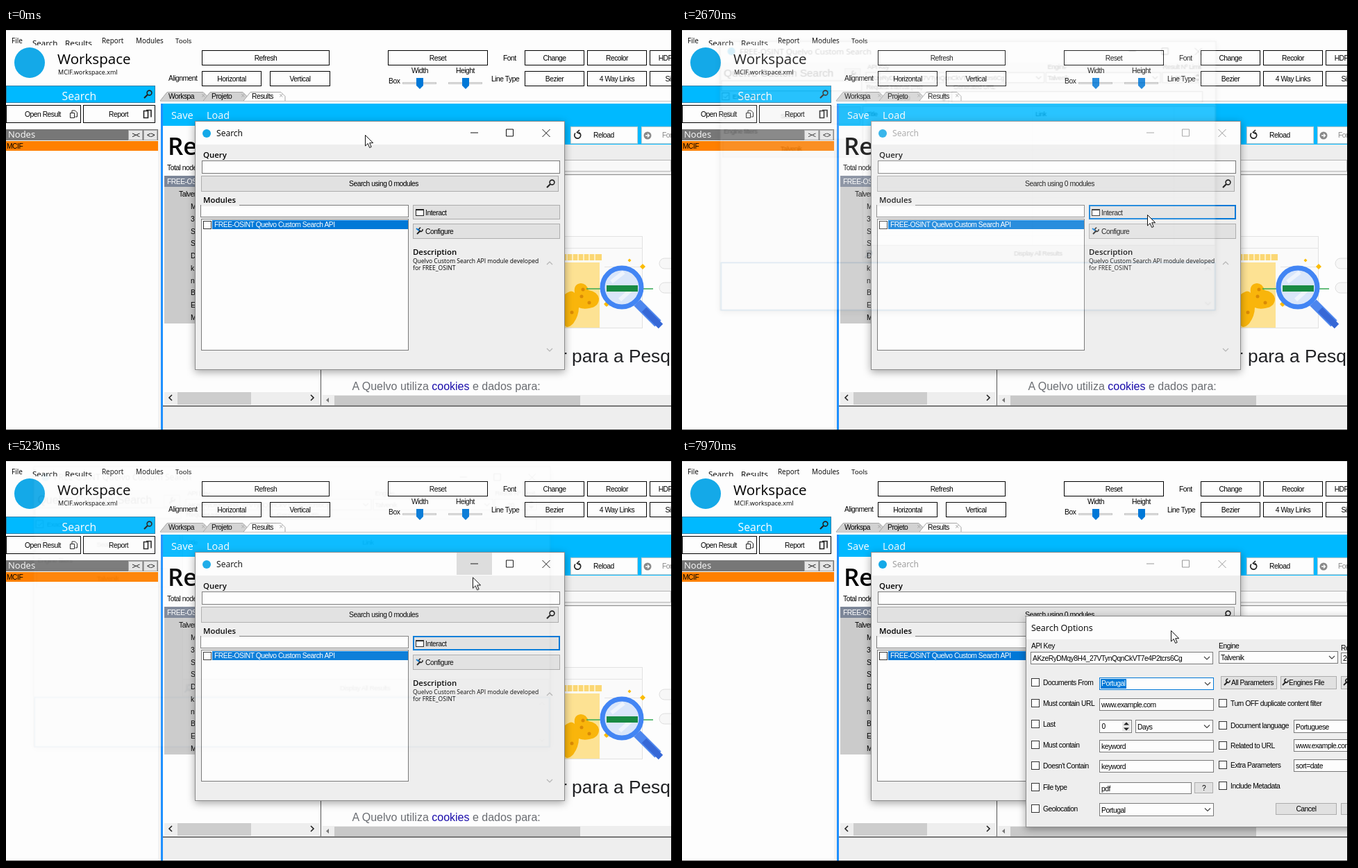
Recreate the animation shown at these times as an HTML page. Size 965 by 581 pixels, loop 8000 ms.

```html
<!DOCTYPE html>
<html lang="en">
<head>
<meta charset="utf-8">
<title>Search modules</title>
<style>
html, body { margin: 0; width: 100%; height: 100%; overflow: hidden; background: #fdfdfd; }
svg { display: block; width: 965px; height: 581px; }
text { white-space: pre; }
.s { font: 10.3px "Liberation Sans", Arial, sans-serif; letter-spacing: -.48px; }
.u { font-family: "Open Sans", "Noto Sans", sans-serif; }
.a { font-family: "Liberation Sans", Arial, sans-serif; }
.shadow { filter: drop-shadow(0 3px 6px rgba(0, 0, 0, .35)); }
#main { transform-origin: 411px 214px; }
#options { transform-origin: 735px 378px; }
</style>
</head>
<body>
<svg id="stage" viewBox="0 0 965 581"></svg>
<script>
const LOOP = 8000;
const SKY = '#00b9ff', BLUE = '#0078d7', FACE = '#eeeeee', EDGE = '#7a7a7a', WHITE = '#fdfdfd';
const KEY = 'AKzeRyDMqy8H4_27VTynQqnCkVT7e4P2tcrs6Cg';

// Boxes are given by their left, top, right and bottom edges.
const box = (l, t, r, b, fill, line, w = 1) => line
  ? `<rect x="${l + w / 2}" y="${t + w / 2}" width="${r - l - w}" height="${b - t - w}" fill="${fill}" stroke="${line}" stroke-width="${w}"/>`
  : `<rect x="${l}" y="${t}" width="${r - l}" height="${b - t}" fill="${fill}"/>`;
const path = (d, stroke = '#222', w = 1, fill = 'none') =>
  `<path d="${d}" fill="${fill}" stroke="${stroke}" stroke-width="${w}"/>`;
const dot = (x, y, r, fill) => `<circle cx="${x}" cy="${y}" r="${r}" fill="${fill}"/>`;
const text = (x, y, s, fill = '#000') => `<text class="s" x="${x}" y="${y}" fill="${fill}">${s}</text>`;
const mid = (x, y, s, fill = '#000') => `<text class="s" x="${x}" y="${y}" fill="${fill}" text-anchor="middle">${s}</text>`;
const ui = (x, y, size, s, fill = '#000', weight = 400) =>
  `<text class="u" x="${x}" y="${y}" font-size="${size}" font-weight="${weight}" fill="${fill}">${s}</text>`;
const group = (id, body) => `<g id="${id}">${body}</g>`;

const button = (l, t, r, b, s, dark) =>
  box(l, t, r, b, dark ? WHITE : '#e1e1e1', dark ? '#000' : '#adadad') + mid((l + r) / 2, (t + b) / 2 + 3.8, s);
const field = (l, t, r, b, s = '', line = EDGE) => box(l, t, r, b, WHITE, line) + text(l + 3, (t + b) / 2 + 4, s);
const chevron = (x, y, dx, dy, c = '#444', w = 1.2) => path(dx
  ? `M${x - 2 * dx} ${y - 4}l${4 * dx} 4l${-4 * dx} 4`
  : `M${x - 4} ${y - 2 * dy}l4 ${4 * dy}l4 ${-4 * dy}`, c, w);
const combo = (l, t, r, b, s, line) => field(l, t, r, b, s, line) + chevron(r - 9, (t + b) / 2, 0, 1);
const spin = (l, t, r, b, s, x) => {
  const m = (t + b) / 2, c = r - 8;
  return box(l, t, r, b, WHITE, EDGE) + box(r - 14, t + 2, r - 2, b - 2, '#e8e8e8') +
    path(`M${c - 4} ${m - 2}h8l-4-4zM${c - 4} ${m + 2}h8l-4 4z`, 'none', 0, '#222') + mid(x, m + 3.5, s);
};
const check = (x, y, on) => box(x, y, x + 12, y + 12, WHITE, '#333') +
  (on ? path(`M${x + 3} ${y + 6}l2.5 2.5l4.5-5`) : '');
const lens = (x, y, c = '#222') => path(`M${x - 1} ${y + 1}l-5 5`, c, 2.2) +
  `<circle cx="${x + 1.5}" cy="${y - 1.5}" r="3.4" fill="none" stroke="${c}" stroke-width="1.6"/>`;
const wrench = (x, y) => path(`M${x - 4} ${y + 4}l5-5`, '#222', 2) +
  path(`M${x + 4} ${y - 3}a2.7 2.7 0 1 1-2.7-2`, '#222', 1.6);
const controls = (x, y, c = '#111') => path(
  `M${x - 5} ${y}h11M${x + 46.5} ${y - 5}h10v10h-10zM${x + 98.5} ${y - 5}l11 11m0-11l-11 11`, c);
const frame = (l, t, r, b, bar) =>
  `<g class="shadow">${box(l, t, r, b, FACE, '#8c8c8c')}</g>` + box(l + 1, t + 1, r - 1, bar, WHITE);

function workspace() {
  let o = box(0, 0, 965, 581, WHITE);
  o += ui(8, 22, 10, 'File') + ui(38, 25.5, 11.6, 'Search') + ui(85, 25.5, 11.6, 'Results') + box(36, 25, 128, 30, WHITE);
  o += ui(138, 22, 9.9, 'Report') + ui(187, 22, 9.9, 'Modules') + ui(244, 22, 9.7, 'Tools');
  o += dot(34, 50, 22, '#14a9e8') + ui(74, 52, 20.6, 'Workspace') + ui(75, 67, 9, 'MCIF.workspace.xml');

  for (const [l, t, r, s] of [
    [282, 32, 466, 'Refresh'], [282, 62, 368, 'Horizontal'], [380, 62, 467, 'Vertical'], [550, 32, 694, 'Reset'],
    [747, 32, 833, 'Change'], [837, 32, 923, 'Recolor'], [927, 32, 975, 'HDPI'],
    [747, 62, 833, 'Bezier'], [837, 62, 923, '4 Way Links'], [927, 62, 990, 'Size']
  ]) o += button(l, t, r, t + 22, s, true);
  o += text(234, 76, 'Alignment') + text(716, 47, 'Font') + text(699, 77, 'Line Type') + text(551, 80, 'Box');
  o += text(584, 65, 'Width') + text(648, 65, 'Height');
  for (const x of [596, 662])
    o += box(x - 25, 78, x + 24, 81, '#e4e4e4', '#c8c8c8') + path(`M${x - 5} 72h10v11l-5 5l-5-5z`, 'none', 0, BLUE);

  // Left column
  o += box(0, 83, 215, 108, SKY, '#2a7fa8') + ui(80.5, 104, 15.8, 'Search', '#fff') + lens(205, 95);
  o += button(0, 111, 108, 137, '', true) + text(27, 128, 'Open Result') + button(111, 111, 215, 137, '', true) + text(148, 128, 'Report');
  o += path('M92.500 122.500h6v7h-6zM95 122v-3h4.500l3 3v6h-3') + path('M198.500 119.500h6v10h-6zM202 118.500h7v10', '#222', 1.6);
  o += box(0, 146, 219, 162, '#777') + ui(3, 158, 13, 'Nodes', '#fff');
  o += box(176, 147, 197, 162, '#e6e6e6', '#aaa') + box(198, 147, 218, 162, '#e6e6e6', '#aaa');
  o += mid(187, 158, '&gt;&lt;') + mid(208.500, 158, '&lt;&gt;');
  o += box(0, 163, 219, 177, '#ff8000') + text(1, 174, 'MCIF') + box(219, 146, 223, 579, '#f2f2f2');

  // Tabs
  const tab = (l, r, s, fill) => path(`M${l} 105l10-12.500h${r - l - 16}l6 6v6.500`, '#a5a5a5', 1, fill) +
    text(l + 12, 101.500, s) + mid(r - 6, 101, '×', '#aaa');
  o += path('M222 105.500H958', '#c4c4c4') + tab(222, 290, 'Workspa', '#d2d2d2') + tab(284, 347, 'Projeto', '#d2d2d2') + tab(342, 402, 'Results', WHITE);

  // Result page
  o += box(223, 109, 958, 141, SKY) + box(223, 109, 226, 579, '#1e90ff');
  o += ui(238, 131, 14.6, 'Save', '#fff') + ui(289, 131, 14.4, 'Load', '#fff');
  o += ui(233, 183, 35, 'Re', '#000', 600) + text(232, 205, 'Total nodes');
  o += box(780, 141, 958, 168, SKY) + box(780, 168, 958, 211, FACE) + box(780, 190, 958, 207, '#f8f8f8', '#b5b5b5');
  o += box(813, 142, 910, 167, WHITE, '#ccc') + text(846, 158, 'Reload') + box(915, 142, 970, 167, WHITE, '#ccc') + text(945, 158, 'Forward', '#888');
  o += path('M820 151.500a4.500 4.500 0 1 0 5-1M826 147l-3.500 3.500l4 2', '#222', 1.7);
  o += dot(924, 155, 5.5, '#8a8a8a') + path('M921 155h5m-2-2.500l2.500 2.500l-2.500 2.500', '#fff', 1.3);

  o += box(228, 229, 440, 426, '#cbcbcb') + box(228, 213, 440, 229, '#7c8698') + box(453, 211, 454, 545, '#555');
  o += text(232, 225, 'FREE-OSINT', '#fff') + text(249, 243, 'Talvenik');
  [...'M3SSDknBEM'].forEach((c, i) => o += text(266, 261 + i * 17.75, c));
  o += box(228, 525, 452, 543, FACE) + box(247, 525, 353, 543, '#cdcdcd') + chevron(237, 533, -1, 0, '#222', 1.6) + chevron(441, 533, 1, 0, '#222', 1.6);
  o += box(455, 211, 958, 212, '#888') + illustration();
  o += `<text class="a" x="799" y="482" font-size="26.300" fill="#202124">r para a Pesquisa</text>`;
  o += `<text class="a" x="498.500" y="522" font-size="16" fill="#6a6d72">A Quelvo utiliza <tspan fill="#1a0dab">cookies</tspan> e dados para:</text>`;
  o += box(455, 529, 958, 544, FACE) + box(473, 530, 827, 544, '#c8c8c8') + path('M465 533v7l-4-3.500z', 'none', 0, '#777');
  return o + box(226, 546, 958, 579, FACE) + box(226, 544, 958, 546, '#777');
}

function illustration() {
  const star = (x, y, r) => path(`M${x} ${y - r}l${r} ${r}l${-r} ${r}l${-r} ${-r}z`, 'none', 0, '#fbbc04');
  let o = box(790, 300, 917, 433, '#fafafa', '#e2e2e2') + path('M790 317.500H917M862 344.500h52M862 400.500h52', '#e4e4e4');
  o += box(800, 326, 858, 335, '#fbd774') + path('M808 326v9m8-9v9m8-9v9m8-9v9m8-9v9m8-9v9', '#fff0c0', 2);
  o += box(800, 338, 855, 432, '#fde293');
  o += path('M805 384q10-8 14-2q-2-13 9-14q8 0 11 10q13 2 15 12q0 12-14 14q-8 2-15-1q0 12-8 23q-8 8-12 3z', 'none', 0, '#f9b50b');
  for (const [x, y] of [[829, 387], [840, 396], [815, 410], [831, 377]]) o += dot(x, y, 2.5, '#d98a06');
  o += star(917, 344, 4) + star(898, 335, 2.5) + star(865, 398, 4);
  o += path('M836 376H932', '#34a853', 1.6);
  o += path('M909 396L939 426', '#4d86ee', 13) + path('M919 406L943 430', '#3768d6', 9);
  o += `<circle cx="887" cy="374" r="28" fill="#d9e6fa" stroke="#4285f4" stroke-width="7"/>`;
  o += path('M872 366l18-14M884 392l20-18', '#eef4fd', 6) + box(865, 371, 910, 380, '#188a43');
  for (const y of [332, 367]) o += `<rect x="941" y="${y}" width="30" height="15" rx="7.500" fill="#f7f7f7" stroke="#ddd"/>`;
  return o;
}

function searchDialog() {
  let o = frame(272, 134, 805, 493, 168) + dot(289, 152, 6, '#14a9e8');
  o += group('minHot', box(649, 135, 700, 167, '#dcdcdc'));
  o += group('active', ui(303, 156, 12.1, 'Search') + controls(674, 151));
  o += group('inactive', ui(303, 156, 12.1, 'Search', '#999') + controls(674, 151, '#999'));
  o += ui(284, 187, 11.4, 'Query', '#000', 600) + field(282, 191, 798, 210);
  o += button(281, 213, 796, 236, '') + mid(544, 228, 'Search using 0 modules') + lens(785, 224);
  o += ui(284, 252, 11.4, 'Modules', '#000', 600) + field(280, 255, 580, 273) + box(281, 254, 336, 257, FACE);
  o += box(281, 275, 580, 465, WHITE, EDGE) + check(284, 278) + box(297, 277, 579, 290, BLUE);
  o += text(300, 287, 'FREE-OSINT Quelvo Custom Search API', '#fff');
  o += button(586, 255, 798, 276, '') + button(586, 282, 798, 304, '');
  o += group('interHot', box(586, 255, 798, 276, '#e5f1fb', BLUE)) + group('interDown', box(586, 255, 798, 276, '#cce4f7', '#005499'));
  o += group('interFocus', box(586, 255, 798, 276, '#e1e1e1', BLUE, 2)) + group('confHot', box(586, 282, 798, 304, '#e5f1fb', BLUE));
  o += box(590, 261, 602, 271, '#fff', '#222') + box(590, 261, 602, 263, '#222') + text(604, 270, 'Interact');
  o += wrench(596, 293) + path('M591 289l4 3', BLUE, 2) + text(604, 297, 'Configure');
  o += ui(586, 327, 11.4, 'Description', '#000', 600);
  o += ui(586, 339, 8.5, 'Quelvo Custom Search API module developed') + ui(586, 349, 8.5, 'for FREE_OSINT');
  return o + chevron(783, 339, 0, -1, '#b5b5b5') + chevron(783, 464, 0, 1, '#b5b5b5');
}

function mainWindow() {
  let o = frame(22, 1, 802, 425, 35) + dot(40, 17, 6, '#14a9e8') + ui(53, 22, 12.7, 'FREE-OSINT Quelvo Custom Search');
  o += controls(670, 17) + group('closeHot', box(749, 2, 801, 33, '#e81123')) + group('closeDown', box(749, 2, 801, 33, '#f1707a'));
  o += group('closeX', path('M768.500 12l11 11m0-11l-11 11', '#fff'));
  o += `<text class="a" x="28" y="57" font-size="16.700">Quelvo Custom Search</text>`;
  o += button(218, 44, 243, 62, '') + wrench(231, 53) + field(24, 63, 245, 80);
  o += check(25, 82, true) + text(42, 92, 'Exact Term') + button(24, 104, 243, 132, '') + mid(132, 122, 'Search') + lens(35, 117);
  o += text(28, 146, 'Engine filters') + button(26, 155, 242, 184, 'Talvenik');
  o += text(254, 45, 'API Key') + combo(251, 50, 532, 67, KEY) + text(537, 45, 'Engine') + combo(534, 50, 715, 67, 'Talvenik');
  o += text(718, 45, 'Result Nº Limit') + spin(717, 50, 781, 67, '20', 742);
  o += text(252, 77, 'Request Interval (ms)') + spin(251, 81, 382, 99, '1000', 310) + text(389, 77, 'Generated URL') + field(386, 80, 781, 98);
  o += box(246, 103, 801, 323, WHITE, '#999') + text(253, 119, 'Title') + text(518, 119, 'Link');
  for (let y = 157; y < 320; y += 15) o += box(248, y, 799, y + 1, '#f5f5f8');
  for (const x of [513, 735]) o += box(x, 106, x + 1, 322, '#ececf0');
  o += button(246, 322, 801, 348, '') + mid(522, 339, 'Display All Results') + path('M252.500 330.500h7v9h-7z', '#333') + lens(256, 336, '#246');
  o += box(23, 349, 801, 425, FACE, '#1d6fae', 1.5) + chevron(789, 359, 0, -1, '#a0a0a0') + chevron(789, 414, 0, 1, '#a0a0a0');
  return o + group('caret', box(26, 353, 27, 366, '#111'));
}

function optionsWindow() {
  let o = frame(495, 226, 1010, 531, 260) + ui(503, 248, 12.5, 'Search Options');
  o += text(503, 273, 'API Key') + combo(502, 278, 765, 296, KEY) + text(773, 273, 'Engine') + combo(773, 277, 945, 295, 'Talvenik');
  o += text(949, 276, 'Result Nº Limit') + field(949, 279, 1000, 295, '20');
  [['Documents From', 316], ['Must contain URL', 346], ['Last', 376], ['Must contain', 406],
   ["Doesn't Contain", 436], ['File type', 467], ['Geolocation', 498]
  ].forEach(([s, y]) => o += check(503, y) + text(520, y + 10, s));
  o += combo(601, 315, 766, 333, '', BLUE) + box(603, 317, 640, 331, BLUE) + text(604, 327, 'Portugal', '#fff');
  o += field(601, 345, 766, 363, 'www.example.com') + spin(601, 376, 648, 395, '0', 607) + combo(653, 376, 765, 395, 'Days');
  o += field(601, 405, 766, 423, 'keyword') + field(601, 434, 766, 452, 'keyword') + field(601, 466, 734, 483, 'pdf');
  o += button(738, 466, 765, 482, '?') + combo(601, 496, 766, 515, 'Portugal');
  o += button(776, 313, 857, 332, '') + text(791, 326, 'All Parameters') + button(862, 313, 943, 332, '') + text(874, 326, 'Engines File') + button(949, 313, 1000, 332, '');
  for (const x of [785, 869, 957]) o += wrench(x, 322);
  [['Turn OFF duplicate content filter', 346], ['Document language', 378], ['Related to URL', 407],
   ['Extra Parameters', 435], ['Include Metadata', 465]
  ].forEach(([s, y]) => o += check(773, y) + text(790, y + 10, s));
  o += field(881, 376, 1000, 395, 'Portuguese') + field(881, 404, 1000, 422, 'www.example.com') + field(881, 433, 1000, 451, 'sort=date');
  return o + button(855, 496, 943, 513, 'Cancel') + button(949, 496, 1000, 513, 'OK');
}

const stage = document.getElementById('stage');
stage.innerHTML = workspace() + searchDialog() + group('main', mainWindow()) + group('options', optionsWindow()) +
  box(0, 0, 965, 3, '#000') + box(958, 0, 965, 581, '#000') + box(0, 579, 965, 581, '#000') +
  group('cursor', path('M.5 .5V16l3.700-3.500l2.500 6l2.500-1.100l-2.500-5.700h5z', '#111', 1, '#fff'));

const play = (id, frames) => document.getElementById(id).animate(
  frames.map(([t, props]) => ({ ...props, offset: t / LOOP })), { duration: LOOP, iterations: Infinity });

// Visible only inside the given spans of time.
const show = (id, ...spans) => {
  const steps = spans.flatMap(([on, off]) => [[on, 1], [off, 0]]);
  if (steps[0][0] > 0) steps.unshift([0, 0]);
  play(id, [...steps, [LOOP, 0]].map(([t, opacity]) => [t, { opacity, easing: 'step-end' }]));
};

const pose = (opacity, scale) => ({ opacity, transform: `scale(${scale})` });

play('cursor', [
  [0, 517, 154], [1130, 517, 154, 'ease-in-out'], [1930, 670, 269], [3630, 670, 269, 'ease-in-out'],
  [4430, 762, 42], [4500, 762, 42], [4630, 775, 23.5], [5080, 775, 23.5, 'ease-in'], [5230, 672, 170, 'ease-out'],
  [5870, 628, 282], [5930, 628, 282], [6270, 612, 299], [6730, 636, 300], [6770, 636, 300, 'ease-in-out'],
  [7430, 704, 290], [7830, 704, 290], [7970, 704, 247], [LOOP, 704, 247]
].map(([t, x, y, easing = 'linear']) => [t, { transform: `translate(${x}px, ${y}px)`, easing }]));

play('main', [[0, pose(0, .9)], [2640, pose(0, .9)], [2830, pose(1, 1)], [5090, pose(1, 1)],
  [5230, pose(.06, .955)], [5265, pose(0, .945)], [LOOP, pose(0, .9)]]);
play('options', [[0, pose(0, .9)], [7800, pose(0, .9)], [7960, pose(1, 1)], [LOOP, pose(1, 1)]]);

show('active', [0, 2670], [5100, 7830]);
show('inactive', [2670, 5100], [7830, LOOP]);
show('interHot', [1830, 2370]);
show('interDown', [2370, 2500]);
show('interFocus', [2500, 5930]);
show('confHot', [5930, LOOP]);
show('minHot', [5200, 5270]);
show('caret', [2830, 3300], [3800, 4300]);
show('closeHot', [4560, 5100]);
show('closeX', [4560, 5100]);
show('closeDown', [4870, 4900]);
</script>
</body>
</html>
```
